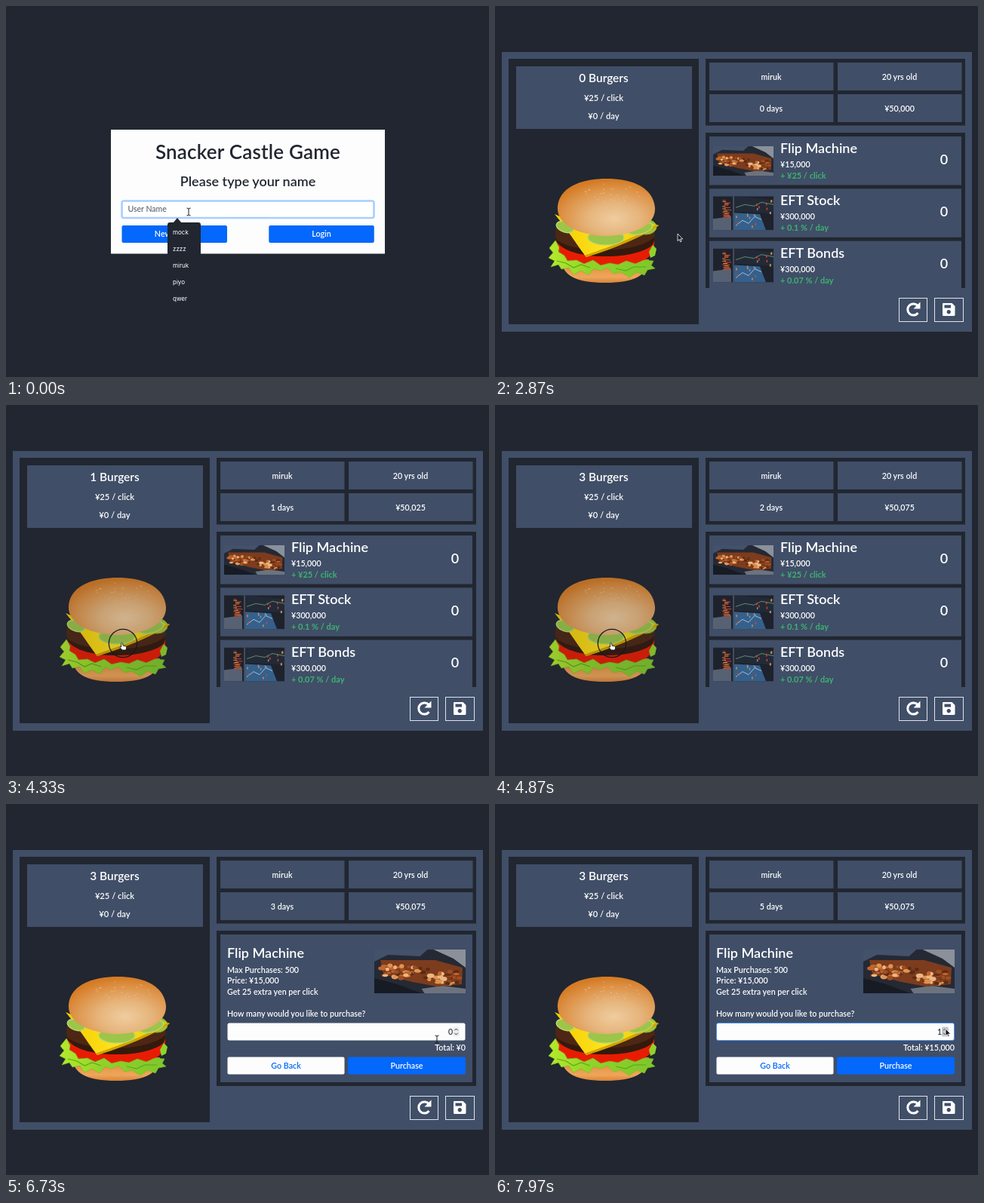
These frames come from a looping animation (640 by 492 pixels, 8000 ms). An HTML page:

```html
<!DOCTYPE html>
<html lang="en">
<head>
<meta charset="utf-8">
<title>Snack game</title>
<style>
  html, body { margin: 0; width: 100%; height: 100%; overflow: hidden; background: #212630; }
  svg { display: block; width: 100vw; height: 100vh; }
  text { font: 600 10.7px Lato, sans-serif; fill: #fff; white-space: pre; }
  .mid { text-anchor: middle; }
  .end { text-anchor: end; }
  .ink { fill: #212630; }
  .h1 { font-size: 26px; letter-spacing: .2px; }
  .h2 { font-size: 18px; }
  .h3 { font-size: 15.4px; }
  .info { font-size: 11.2px; }
  .hint { font: 400 8px Inter, sans-serif; }
  .field { font-weight: 500; font-size: 10.5px; }
  .gain { font-weight: 700; font-size: 11px; fill: #3cb371; }
  .dark { fill: #212630; }
  .slate { fill: #404e67; }
  .blue { fill: #0368fb; }
  .white { fill: #fdfdfe; }
  .tool { fill: none; stroke: #dfe3ea; }
</style>
</head>
<body>
<svg viewBox="0 0 640 492" preserveAspectRatio="none">
  <defs>
    <radialGradient id="bunTop" cx=".58" cy=".7" r=".68">
      <stop offset="0" stop-color="#efcc9f"/>
      <stop offset=".4" stop-color="#e6b57c"/>
      <stop offset=".8" stop-color="#dc9044"/>
      <stop offset="1" stop-color="#d57b25"/>
    </radialGradient>
    <linearGradient id="bunBase" x1="0" y1="0" x2="0" y2="1">
      <stop offset="0" stop-color="#d88535"/>
      <stop offset=".75" stop-color="#efa65a"/>
      <stop offset="1" stop-color="#d9843a"/>
    </linearGradient>
    <linearGradient id="leaf" x1="0" y1="0" x2="1" y2="0">
      <stop offset="0" stop-color="#b4ea2c"/>
      <stop offset=".4" stop-color="#8fd32a"/>
      <stop offset="1" stop-color="#7fc62c"/>
    </linearGradient>
    <linearGradient id="cheese" x1="0" y1="0" x2="1" y2="0">
      <stop offset="0" stop-color="#f3cd00"/>
      <stop offset=".5" stop-color="#ffe21f"/>
      <stop offset="1" stop-color="#e6c400"/>
    </linearGradient>
    <clipPath id="listClip"><rect x="279" y="168" width="344" height="206"/></clipPath>
    <symbol id="grill" viewBox="0 0 120 58" preserveAspectRatio="none">
      <rect width="120" height="58" fill="#252934"/>
      <path d="M0 0H70L60 9 18 7 0 16Z" fill="#43516a"/>
      <path d="M78 0H120V24L104 12Z" fill="#8b919b"/>
      <path d="M0 38 30 46 62 58H0Z" fill="#171b24"/>
      <path d="M62 52 90 48 120 52V58H66Z" fill="#6d737e"/>
      <path d="M8 14 40 14 80 14 116 24 115 46 82 49 50 43 12 33Z" fill="#7c3c1d"/>
      <g id="meat"/>
    </symbol>
    <symbol id="market" viewBox="0 0 80 45" preserveAspectRatio="none">
      <rect width="80" height="45" fill="#1e222c"/>
      <path d="M28 0 80 5V23L28 20Z" fill="#232a37"/>
      <path d="M28 22 62 24 70 45H28Z" fill="#35608c"/>
      <path d="M0 30 24 27V45H0Z" fill="#566173"/>
      <path d="M27 0V45" stroke="#69778a" fill="none"/>
      <path d="M30 39 39 32 47 36 55 27 64 31" stroke="#a9bccd" fill="none"/>
      <path d="M30 15 42 11 54 13 64 8 80 11" stroke="#5c8a72" fill="none"/>
      <g id="ticks"/>
    </symbol>
  </defs>

  <rect width="640" height="492" class="dark"/>

  <g id="login">
    <rect x="139" y="164" width="363" height="164.5" class="white"/>
    <text x="320.5" y="203" class="h1 ink mid">Snacker Castle Game</text>
    <text x="320.5" y="239" class="h2 ink mid">Please type your name</text>
    <rect x="153.5" y="258.5" width="334" height="22.5" rx="2.5" fill="#fff" stroke="#a8cefe" stroke-width="2.6"/>
    <text id="name" x="161.5" y="273.3" class="field"></text>
    <path id="nameCaret" d="M185.5 263V276" stroke="#212630"/>
    <rect x="153.5" y="291" width="139.5" height="23" rx="2" class="blue"/>
    <rect x="348.3" y="291" width="139.5" height="23" rx="2" class="blue"/>
    <text x="223" y="306" class="mid">New Game</text>
    <text x="418" y="306" class="mid">Login</text>
    <g id="popup">
      <path d="M221 288 227 281 233 288Z" class="dark"/>
      <rect x="214" y="287" width="44" height="112" rx="3" class="dark"/>
      <rect id="pick" x="214" width="44" height="19" fill="#3b4250"/>
      <g id="hints"/>
    </g>
  </g>

  <g id="game">
    <rect x="9" y="61" width="623" height="371" class="slate"/>
    <rect x="18" y="70" width="252" height="352" class="dark"/>
    <rect x="28" y="80" width="233" height="83" class="slate"/>
    <text id="burgers" x="144" y="101" class="h3 mid"></text>
    <text x="144" y="125.5" class="info mid">¥25 / click</text>
    <text x="144" y="150" class="info mid">¥0 / day</text>

    <g id="burger">
      <path d="M88 336C89 358 108 367 146 367S202 358 204 336Z" fill="url(#bunBase)"/>
      <path d="M81 309C79 334 92 346 146 346S213 332 211 309Z" fill="#e81c03"/>
      <path d="M204 326 209 317 214 322 212 331 206 334Z" fill="#8fd32a"/>
      <path d="M80 311 85 320 84 326 92 331 96 338 108 337 118 342 130 337 140 344 152 341 163 343 174 338 186 342 197 337 210 338 207 344 212 348 202 350 198 357 188 353 178 360 167 353 157 355 149 347 139 351 131 348 124 357 114 351 104 356 98 347 88 349 84 343 74 346 79 338 71 334 77 327 72 321Z" fill="url(#leaf)" stroke="#79bd25" stroke-width=".6" stroke-linejoin="round"/>
      <path d="M82 338 94 341 104 347 114 343 126 347M160 348 173 351 184 346 200 346" fill="none" stroke="#5aa81f" stroke-width="1.2"/>
      <path d="M82 289C79 302 79 312 87 318 110 337 182 336 206 319 213 314 213 300 209 289Z" fill="#4d2713"/>
      <path d="M81 309C100 329 192 329 211 306 211 313 210 316 206 319 182 336 110 337 87 318 82 314 81 312 81 309Z" fill="#331a0d"/>
      <ellipse cx="200" cy="293" rx="14" ry="10" fill="#9bc544" stroke="#7fae33"/>
      <path d="M79 276 98 284 190 284 217 291C201 303 165 319 121 333 109 318 101 303 79 276Z" fill="url(#cheese)"/>
      <path d="M217 291C201 303 165 319 121 333L119.500 330.500C160 317 196 302 214 290Z" fill="#cfa300"/>
      <g fill="#9cc54a" stroke="#b9d96a" stroke-width="1.5">
        <ellipse cx="93" cy="293" rx="12" ry="7" transform="rotate(18 93 293)"/>
        <ellipse cx="147" cy="307" rx="24" ry="10"/>
        <ellipse cx="192" cy="295" rx="17" ry="7.500" transform="rotate(-14 192 295)"/>
      </g>
      <path d="M83 266C85 242 111 229 148 229 186 229 210 243 212 268 213 289 188 303 150 305 112 305 81 290 83 266Z" fill="url(#bunTop)"/>
      <g id="seeds" fill="#f2cf92"/>
    </g>

    <rect x="279" y="70" width="344" height="88.5" class="dark"/>
    <g id="cells"/>
    <rect x="279" y="168" width="344" height="206" class="dark"/>

    <g id="list" clip-path="url(#listClip)">
      <g id="rows"/>
      <rect id="hover" x="283" y="172" width="336" height="67" fill="none" stroke="#1683d6" stroke-width="2.2"/>
    </g>

    <g id="detail">
      <rect x="284" y="173" width="334" height="196" class="slate"/>
      <text x="293" y="204" class="h2">Flip Machine</text>
      <text x="293" y="223.5">Max Purchases: 500</text>
      <text x="293" y="238.3">Price: ¥15,000</text>
      <text x="293" y="253">Get 25 extra yen per click</text>
      <use href="#grill" x="488" y="193" width="121" height="58"/>
      <text x="293" y="282">How many would you like to purchase?</text>
      <rect id="amountBox" x="293.5" y="290.5" width="315" height="23" rx="2.5" class="white"/>
      <text id="amount" x="592" y="305.5" class="field ink end"></text>
      <rect id="spin" x="592" y="295.5" width="9" height="13" rx="2"/>
      <path d="M594.3 300.3 596.5 298 598.7 300.3M594.3 303.7 596.5 306 598.7 303.7" fill="none" stroke="#333"/>
      <text id="total" x="609" y="327" class="end"></text>
      <rect x="293.5" y="335.5" width="155" height="23" rx="2" class="white"/>
      <rect x="453" y="335.5" width="156" height="23" rx="2" class="blue"/>
      <text x="371" y="350.8" class="mid" style="fill:#0368fb">Go Back</text>
      <text x="531" y="350.8" class="mid">Purchase</text>
    </g>

    <rect x="535.5" y="387.5" width="37" height="31" class="tool"/>
    <rect x="582.5" y="387.5" width="38" height="31" class="tool"/>
    <path d="M560.5 398A7.6 7.6 0 1 0 560.5 407" fill="none" stroke="#fff" stroke-width="3"/>
    <path d="M563.5 392.5V401.5H554.5Z" fill="#fff"/>
    <path d="M594 394H605.5L609.5 398V409.5Q609.5 411 608 411H594.5Q593 411 593 409.5V395Q593 394 594 394ZM595.5 396.5V400.5H604V396.5ZM601.2 403A2.7 2.7 0 1 0 601.3 403Z" fill="#fff" fill-rule="evenodd"/>
  </g>

  <circle id="ring" cx="155" cy="316" r="18.7" fill="none" stroke="#15171c" stroke-width="1.2"/>
  <g id="cursor">
    <path id="beam" d="M-2.5 -5Q0 -5 0 -3.5Q0 -5 2.5 -5M0 -3.5V3.5M-2.5 5Q0 5 0 3.5Q0 5 2.5 5" fill="none" stroke="#16181d"/>
    <path id="arrow" d="M0 0V9.5L2.2 7.5 3.7 10.8 5.2 10.1 3.7 7H6.7Z" fill="#15171c" stroke="#fff" stroke-width=".8"/>
    <path id="hand" d="M-2.3 -4Q-1.4 -5.3 -.5 -4L.2 -.8 3.6 0Q5 .5 4.7 2L3.8 5H-1L-4 1.5Q-3.8 .2 -2.3 1Z" fill="#fff" stroke="#15171c" stroke-width=".9"/>
  </g>
</svg>
<script>
const LOOP = 8000, GAME_AT = 2800, DETAIL_AT = 5850, BUY_AT = 7350, DAY = 1010;
const CLICKS = [4290, 4570, 4850];
const PLAYER = 'miruk';
const HINTS = ['mock', 'zzzz', PLAYER, 'piyo', 'qwer'];
const ITEMS = [
  ['Flip Machine', '¥15,000', '+ ¥25 / click', 'grill'],
  ['EFT Stock', '¥300,000', '+ 0.1 % / day', 'market'],
  ['EFT Bonds', '¥300,000', '+ 0.07 % / day', 'market']
];
// time, x, y and shape held from that time on
const MOVES = [
  [0, 242, 273, 'beam'], [570, 242, 273, 'beam'], [740, 242, 287, 'arrow'],
  [800, 242, 292, 'hand'], [930, 241, 300, 'hand'], [1670, 241, 300, 'hand'],
  [1930, 242, 302, 'hand'], [GAME_AT, 242, 302, 'arrow'], [3250, 242, 302, 'arrow'],
  [3600, 222, 316, 'arrow'], [3700, 221, 316, 'arrow'], [3800, 208, 317, 'hand'],
  [4080, 155, 320, 'hand'], [4980, 155, 320, 'hand'], [5090, 214, 292, 'arrow'],
  [5200, 300, 245, 'hand'], [5400, 449, 205, 'hand'], [DETAIL_AT, 449, 205, 'arrow'],
  [6250, 449, 205, 'arrow'], [6550, 550, 300, 'beam'], [6720, 571, 312, 'beam'],
  [6800, 571, 312, 'beam'], [7080, 594, 302, 'arrow'], [7200, 597, 298, 'arrow']
];

const $ = id => document.getElementById(id);
const show = (id, on) => { $(id).style.display = on ? '' : 'none'; };
const write = (id, s) => { if ($(id).textContent !== s) $(id).textContent = s; };
const yen = n => '¥' + n.toLocaleString('en-US');
const list = (n, f) => Array.from({ length: n }, (_, i) => f(i)).join('');

function seeded(seed) {
  return () => (seed = (seed * 16807) % 2147483647) / 2147483647;
}

function build() {
  const rnd = seeded(41);
  $('hints').innerHTML = HINTS.map((h, i) =>
    `<text x="221" y="${303 + 22 * i}" class="hint">${h}</text>`).join('');

  $('cells').innerHTML = [PLAYER, '20 yrs old', '', ''].map((s, i) => {
    const x = i % 2 ? 454 : 284, y = i < 2 ? 75 : 117;
    return `<rect x="${x}" y="${y}" width="164.5" height="37" class="slate"/>
      <text id="cell${i}" x="${x + 82}" y="${y + 22.5}" class="mid">${s}</text>`;
  }).join('');

  $('rows').innerHTML = ITEMS.map(([name, price, gain, pic], i) => {
    const [top, h] = pic === 'grill' ? [13, 39] : [10, 45];
    return `<g transform="translate(284 ${173 + 69.3 * i})">
      <rect width="334" height="64.5" class="slate"/>
      <use href="#${pic}" x="5" y="${top}" width="80" height="${h}"/>
      <text x="94" y="22" class="h2">${name}</text>
      <text x="94" y="41">${price}</text>
      <text x="94" y="56" class="gain">${gain}</text>
      <text x="311" y="36.5" class="h2 mid">0</text></g>`;
  }).join('');

  const tones = ['#c2662c', '#e09450', '#a04c22', '#ecb782', '#5d2a14'];
  $('meat').innerHTML = list(60, i => {
    const x = 10 + rnd() * 104, y = 17 + x * .12 + rnd() * 17;
    return `<ellipse cx="${x}" cy="${y}" rx="${2 + rnd() * 3}" ry="${1.2 + rnd() * 1.8}" fill="${tones[i % 5]}"/>`;
  });

  const marks = ['#d4472f', '#e08a3c', '#7f95ad'];
  $('ticks').innerHTML = list(15, i =>
    `<rect x="${12 + rnd() * 3}" y="${5 + i * 1.6}" width="${4 + rnd() * 6}" height="1" fill="${marks[i % 2]}"/>`) +
    list(18, i =>
    `<rect x="${30 + rnd() * 47}" y="${4 + rnd() * 36}" width="1.5" height="3" fill="${marks[i % 3]}"/>`);

  $('seeds').innerHTML = list(30, () => {
    const a = rnd() * 6.28, r = Math.sqrt(rnd());
    return `<circle cx="${157 + Math.cos(a) * r * 40}" cy="${247 + Math.sin(a) * r * 13}" r=".6"/>`;
  });
}

function pointer(t) {
  let i = MOVES.length - 1;
  while (MOVES[i][0] > t) i--;
  const [t0, x0, y0, shape] = MOVES[i];
  const [t1, x1, y1] = MOVES[i + 1] || [LOOP, x0, y0];
  const k = (t - t0) / (t1 - t0);
  return [x0 + (x1 - x0) * k, y0 + (y1 - y0) * k, shape];
}

function drawLogin(t) {
  const picked = Math.min(2, Math.floor(t / 110) - 1);
  const open = t < 420;
  write('name', picked < 0 ? 'User Name' : HINTS[picked]);
  $('name').style.fill = picked < 0 ? '#5c636c' : '#212630';
  show('popup', open);
  show('pick', open && picked >= 0);
  $('pick').setAttribute('y', 291 + 22 * Math.max(0, picked));
  show('nameCaret', t > 700 && t < 1200);
}

function drawGame(t, x, y) {
  const made = CLICKS.filter(c => t >= c).length;
  const detail = t >= DETAIL_AT, bought = t >= BUY_AT ? 1 : 0;
  write('burgers', made + ' Burgers');
  write('cell2', Math.floor((t - GAME_AT) / DAY) + ' days');
  write('cell3', yen(50000 + 25 * made));
  $('burger').style.opacity = x < 213 ? .85 : 1;
  show('list', !detail);
  show('detail', detail);
  show('hover', x > 284 && y < 238);
  write('amount', String(bought));
  write('total', 'Total: ' + yen(15000 * bought));
  $('amountBox').setAttribute('stroke', bought ? '#4a94f5' : 'none');
  $('spin').setAttribute('fill', bought ? '#c3c8ce' : '#eceef0');
}

function draw(t) {
  const [x, y, shape] = pointer(t), inGame = t >= GAME_AT;
  show('login', !inGame);
  show('game', inGame);
  if (inGame) drawGame(t, x, y); else drawLogin(t);
  show('ring', CLICKS.some(c => t >= c - 40 && t < c + 120));
  $('cursor').setAttribute('transform', `translate(${x} ${y})`);
  for (const id of ['beam', 'arrow', 'hand']) show(id, id === shape);
}

build();
const start = performance.now();
function tick() {
  draw((performance.now() - start) % LOOP);
  requestAnimationFrame(tick);
}
tick();
</script>
</body>
</html>
```
